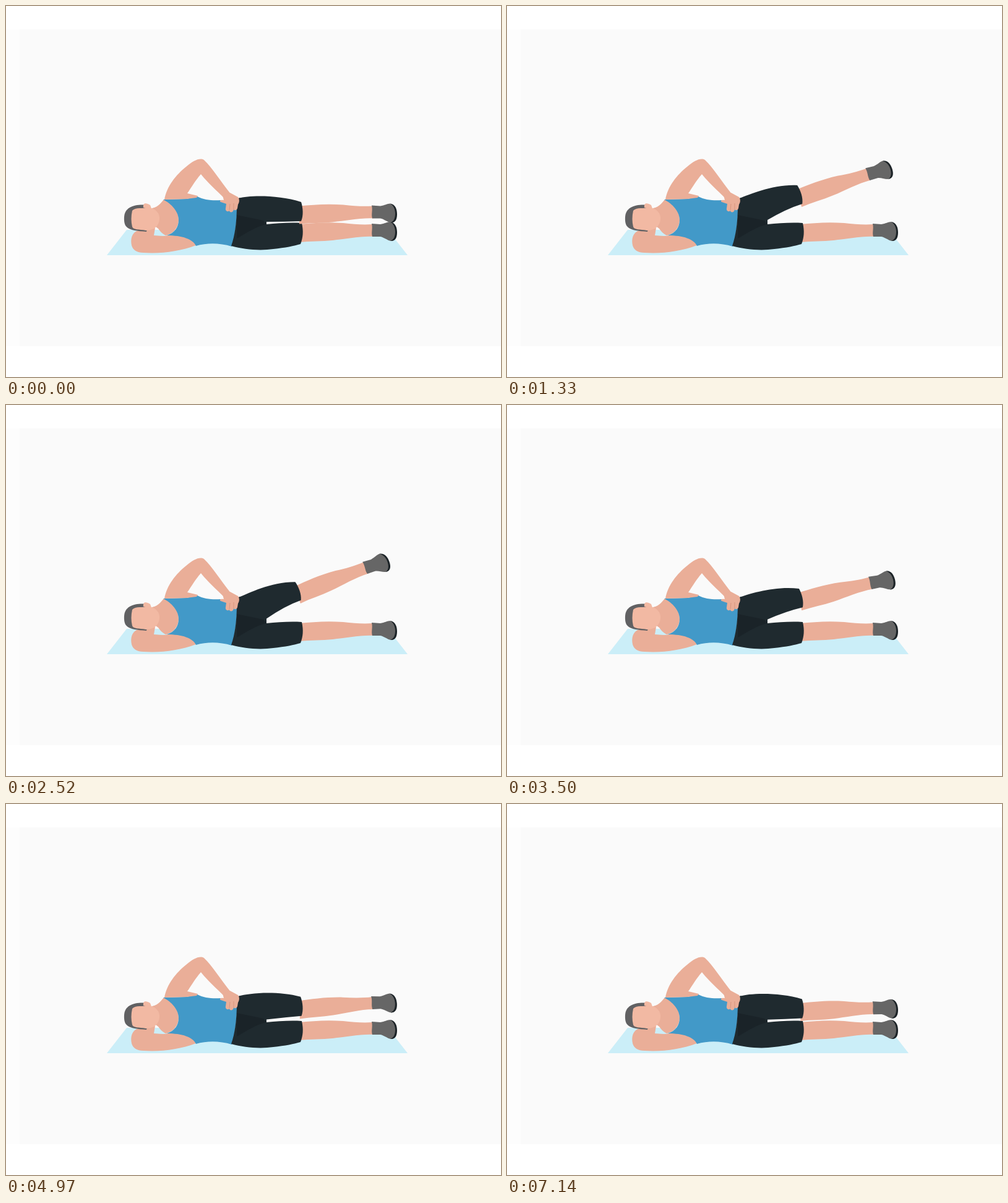
Animation, 800 px wide and 600 px high, one loop 7.21 s. Source, as an HTML page with a canvas:

```html
<!DOCTYPE html>
<html lang="en">
<head>
<meta charset="utf-8">
<title>Side leg raise</title>
<style>
  html, body { margin: 0; width: 100%; height: 100%; overflow: hidden; background: #fff; }
  canvas { display: block; width: 800px; height: 600px; }
</style>
</head>
<body>
<canvas id="stage" width="800" height="600"></canvas>
<script>
const ctx = document.getElementById('stage').getContext('2d');

const STEP = 70, STEPS = 103;   // one loop = 7210 ms, forward then back
const CYCLE = 2100, MOVE = 700, FALL_AT = 1030, LEAD = 10;
const SWING = 27.2 * Math.PI / 180;
const HIP = [371, 333], KNEE = [478, 334];

const COLOR = {
  panel: '#fafafa', mat: '#cbeef8', skin: '#eaae98', face: '#f2b9a3', hair: '#616163',
  shirt: '#4299c8', shorts: '#1f2a2f', crease: '#1a2328', shoe: '#666666', sole: '#1c2327'
};

const SHAPE = {
  mat: 'M163,403 L195,362 L617,362 L649,403 Z',
  underArm: 'M213,363 C203,367 201,377 203,387 C205,395 212,399 222,399 C250,401 281,397 307,387 ' +
    'C302,376 285,369 262,371 C253,373 246,371 239,371 L241,359 Z',
  neck: 'M236,327 C247,325 252,316 255,313 C270,318 279,333 279,346 C279,358 270,369 258,371 ' +
    'C252,368 249,364 246,360 L235,352 Z',
  hair: 'M229,322 C208,320 192,325 191,341 C190,359 196,363 227,365 L232,345 Z',
  ear: 'M222,326 C221,318 226,318 233,322 L236,330 Z',
  face: 'M204,331 C209,325 221,328 231,326 C243,328 249,336 248,345 C247,356 239,363 226,363 ' +
    'C215,361 205,362 204,357 C202,349 202,340 204,331 Z',
  shirt: 'M254,313 L292,312 L309,308 C320,314 335,315 347,314 L374,321 C373,345 371,370 365,389 ' +
    'C345,383 325,383 307,388 C302,377 285,371 260,371 C273,367 279,357 279,346 C279,333 268,320 254,313 Z',
  raisedArm: 'M256,313 C260,291 275,273 291,260 C303,250 313,245 320,249 C334,262 346,283 364,305 ' +
    'L353,311 C340,298 327,287 315,272 C306,282 300,293 293,303 L310,307 L308,310 L292,312 Z',
  hand: 'M350,306 L362,302 L375,309 C378,313 377,318 375,321 L374,327 C373,331 369,331 368,329 ' +
    'C367,335 361,334 361,331 C358,334 354,331 355,327 L356,320 L347,317 C344,315 347,313 352,314 Z',
  lowerShorts: 'M377,310 L373,322 C373,348 370,371 364,388 C385,394 411,396 432,393 ' +
    'C451,391 466,388 476,385 C480,375 481,364 478,351 C460,350 440,351 421,353 L421,344 L400,318 Z',
  crease: 'M373,338 L416,347 L421,353 C405,356 391,366 373,376 Z',
  shin: 'M474,353 C495,351 518,349 545,351 C562,353 577,354 593,353 L593,373 ' +
    'C573,372 548,377 528,379 C510,381 492,380 474,382 Z',
  shoe: 'M591,352 L605,353 C612,352 616,349 621,349 C628,351 631,358 631,366 C631,374 629,380 622,380 ' +
    'C616,379 611,374 605,373 L592,373 C590,366 593,360 591,352 Z',
  sole: 'M621,349 C629,350 632,358 632,366 C632,375 629,381 621,380 C627,378 629,372 629,365 ' +
    'C629,358 626,352 621,349 Z'
};
for (const name in SHAPE) SHAPE[name] = new Path2D(SHAPE[name]);

function paint(name, color) {
  ctx.fillStyle = color;
  ctx.fill(SHAPE[name]);
}

const ease = x => (1 - Math.cos(Math.PI * Math.min(1, Math.max(0, x)))) / 2;

// 0 = legs together, 1 = fully raised
function lift(ms) {
  const p = (ms + LEAD) % CYCLE;
  return p < FALL_AT ? ease(p / MOVE) : 1 - ease((p - FALL_AT) / MOVE);
}

function aroundHip(x, y, angle) {
  const dx = x - HIP[0], dy = y - HIP[1];
  const c = Math.cos(angle), s = Math.sin(angle);
  return [HIP[0] + dx * c + dy * s, HIP[1] - dx * s + dy * c];
}

function calf() {
  paint('shin', COLOR.skin);
  paint('shoe', COLOR.shoe);
  paint('sole', COLOR.sole);
}

function raisedLeg(k) {
  const thigh = SWING * 0.94 * k, shin = SWING * 1.06 * k;
  const at = (x, y) => aroundHip(x, y, thigh);

  ctx.save();
  ctx.translate(...at(...KNEE));
  ctx.rotate(-shin);
  ctx.translate(-KNEE[0], -KNEE[1] - 29.5);
  calf();
  ctx.restore();

  ctx.fillStyle = COLOR.shorts;
  ctx.beginPath();
  ctx.moveTo(376, 311);
  ctx.bezierCurveTo(392, 306 - 2 * k, ...at(440, 305), ...at(477, 317));
  ctx.bezierCurveTo(...at(480, 326), ...at(481, 339), ...at(477, 348));
  ctx.quadraticCurveTo(...at(450, 349), 421, 349 - 5 * k);
  ctx.lineTo(400, 360);
  ctx.lineTo(374, 340);
  ctx.fill();
}

function fingers() {
  ctx.strokeStyle = '#d8967f';
  ctx.lineWidth = 1;
  ctx.beginPath();
  ctx.moveTo(361, 330);
  ctx.lineTo(362, 320);
  ctx.moveTo(368, 329);
  ctx.lineTo(368, 319);
  ctx.stroke();
}

function draw(k) {
  ctx.fillStyle = '#fff';
  ctx.fillRect(0, 0, 800, 600);
  ctx.fillStyle = '#fdfdfd';
  ctx.fillRect(0, 38, 22, 512);
  ctx.fillStyle = COLOR.panel;
  ctx.fillRect(22, 38, 778, 512);

  paint('mat', COLOR.mat);
  calf();
  paint('underArm', COLOR.skin);
  paint('neck', COLOR.skin);
  paint('hair', COLOR.hair);
  paint('ear', COLOR.face);
  paint('face', COLOR.face);
  paint('shirt', COLOR.shirt);
  paint('lowerShorts', COLOR.shorts);
  raisedLeg(k);
  paint('crease', COLOR.crease);
  paint('raisedArm', COLOR.skin);
  paint('hand', COLOR.skin);
  fingers();
}

function tick() {
  const n = Math.floor(performance.now() / STEP) % STEPS;
  draw(lift(Math.min(n, STEPS - n) * STEP));
  requestAnimationFrame(tick);
}
tick();
</script>
</body>
</html>
```
